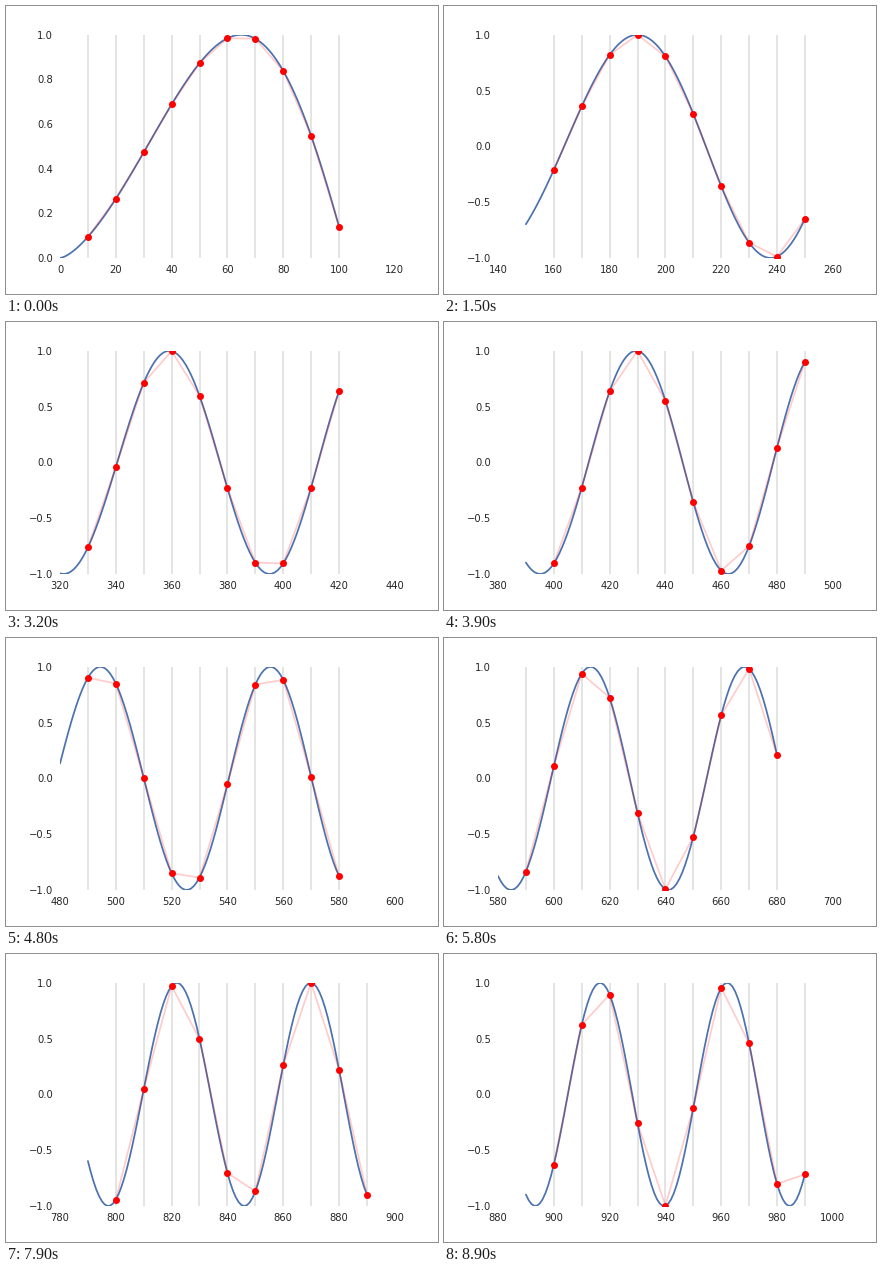
Animation of 432 by 288 pixels, one loop 9 s. Source, as a matplotlib script:

```python
import numpy as np
import matplotlib.pyplot as plt
from matplotlib.animation import FuncAnimation

FRAMES, INTERVAL = 90, 100
STEP, SPAN = 10, 100
INK = "#262626"

plt.rcParams.update({
    "font.family": "DejaVu Sans",
    "font.size": 10,
    "lines.linewidth": 1.75,
    "lines.solid_capstyle": "round",
    "xtick.major.size": 0, "ytick.major.size": 0,
    "xtick.major.pad": 7, "ytick.major.pad": 7,
    "xtick.color": INK, "ytick.color": INK,
})


def chirp(x):
    return np.sin(0.003 * x ** 1.5)


def y_range(low):
    """Lower limit and tick step that enclose the visible wave."""
    step = 0.2 if low > -0.8 else 0.5
    return step * np.floor(low / step), step


fig = plt.figure(figsize=(6, 4), dpi=72, facecolor="white")
ax = fig.add_axes([0.125, 0.125, 0.775, 0.775])
for spine in ax.spines.values():
    spine.set_visible(False)

rules = [ax.axvline(0, color="black", alpha=0.12, zorder=1)
         for _ in range(SPAN // STEP)]
wave, = ax.plot([], [], color="#4C72B0", zorder=2)
chords, = ax.plot([], [], color="red", alpha=0.2, zorder=3)
dots, = ax.plot([], [], "o", color="red", ms=7, mew=0, zorder=4)


def update(i):
    start = i * STEP
    x = np.arange(start, start + SPAN + 1.0)
    samples = x[STEP::STEP]
    wave.set_data(x, chirp(x))
    for line in (chords, dots):
        line.set_data(samples, chirp(samples))
    for rule, s in zip(rules, samples):
        rule.set_xdata([s, s])

    left = start // 20 * 20
    ax.set_xticks(np.arange(left, left + 121, 20))
    ax.set_xlim(left, left + 120)

    low, step = y_range(chirp(x).min())
    count = int(round((1 - low) / step)) + 1
    ax.set_yticks(np.round(np.linspace(low, 1, count), 1))
    ax.set_ylim(low, 1)
    return [wave, chords, dots, *rules]


anim = FuncAnimation(fig, update, frames=FRAMES, init_func=lambda: update(0),
                     interval=INTERVAL, repeat=True, repeat_delay=0, blit=False)
plt.show()
```
